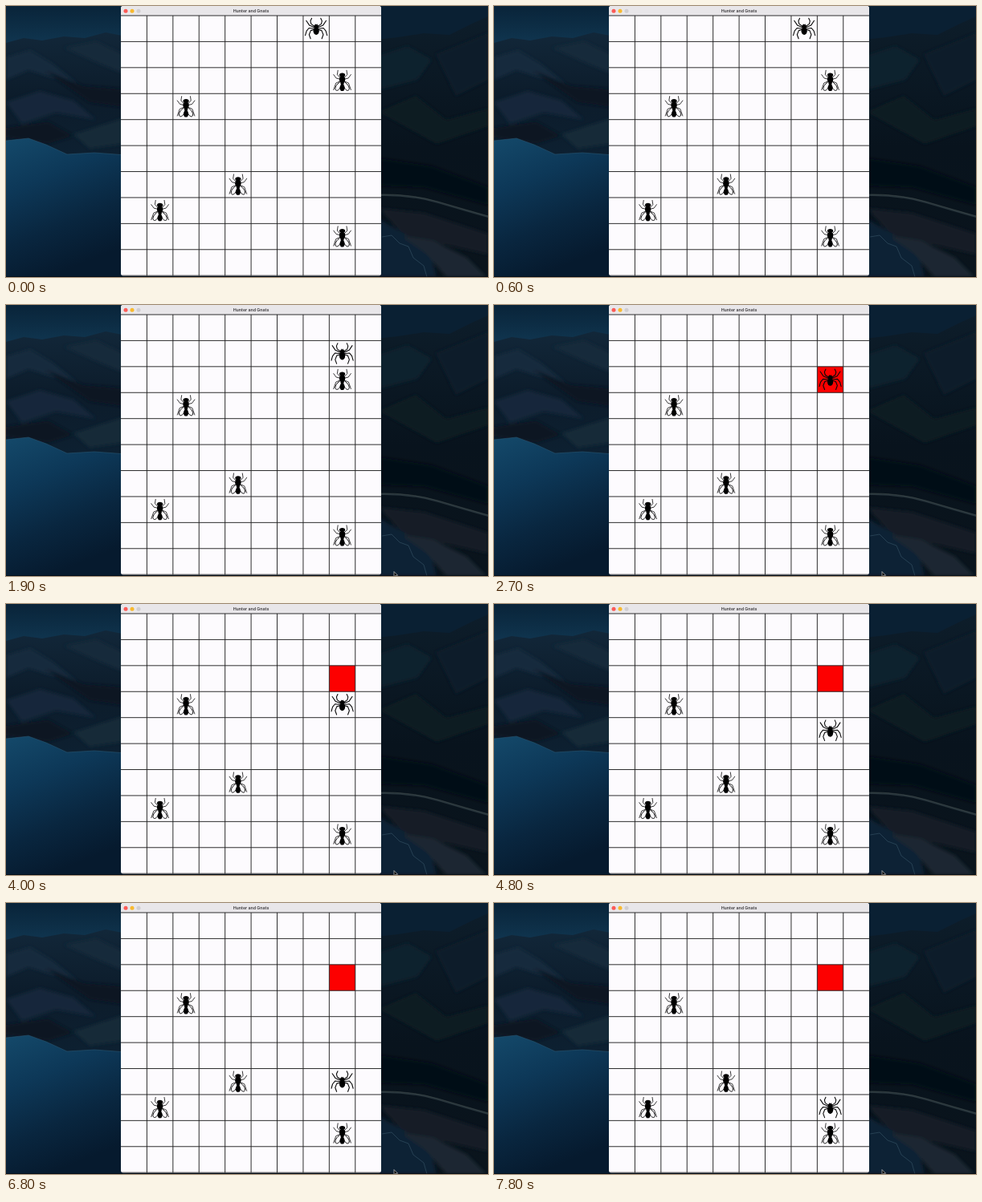
An HTML page for the animation above (8 s loop, 600x338 px).

```html
<!DOCTYPE html>
<html lang="en">
<head>
<meta charset="utf-8">
<title>Hunter and Gnats</title>
<style>
  html, body { margin: 0; width: 100%; height: 100%; overflow: hidden; background: #071420; }
  svg { display: block; width: 100vw; height: 100vh; }
  .title { font: 600 5.3px Inter, "Open Sans", sans-serif; fill: #3c3a3d; text-anchor: middle; }
  .legs { fill: none; stroke: #0a0a0a; stroke-linejoin: round; stroke-linecap: round; }
</style>
</head>
<body>
<svg viewBox="0 0 600 338" preserveAspectRatio="none">
  <defs>
    <linearGradient id="sky" x2="0" y2="1">
      <stop offset="0" stop-color="#092439"/><stop offset="1" stop-color="#123a56"/>
    </linearGradient>
    <linearGradient id="hill" x2="0" y2="1">
      <stop offset="0" stop-color="#122739"/><stop offset=".5" stop-color="#0c1c2b"/><stop offset="1" stop-color="#0d2031"/>
    </linearGradient>
    <linearGradient id="sea" x2=".35" y2="1">
      <stop offset="0" stop-color="#14496a"/><stop offset=".35" stop-color="#0d3858"/>
      <stop offset=".7" stop-color="#09263f"/><stop offset="1" stop-color="#061a2e"/>
    </linearGradient>
    <linearGradient id="east" x2="0" y2="1">
      <stop offset="0" stop-color="#0d1d2a"/><stop offset=".5" stop-color="#08131d"/><stop offset="1" stop-color="#0a141c"/>
    </linearGradient>
    <filter id="soft" x="-20%" y="-20%" width="140%" height="140%"><feGaussianBlur stdDeviation="2.2"/></filter>
    <clipPath id="frame"><rect x="143" y="0" width="324" height="336.5" rx="3"/></clipPath>

    <g id="half-fly">
      <path class="legs" stroke-width=".8" d="M-3-4L-6.2-7.5L-5.4-12.8M-3-2L-7.5-3L-10.8-7.5M-3 1L-7.8 3L-10.8 11.5"/>
      <path d="M-2 1C-5 3-9.2 7-8.6 10.6C-8.1 13.4-4.4 13-2.2 8" fill="#fdfbfe" stroke="#0a0a0a" stroke-width="1"/>
    </g>
    <g id="fly">
      <use href="#half-fly"/><use href="#half-fly" transform="scale(-1 1)"/>
      <ellipse cy="-7" rx="3.6" ry="2.5"/>
      <ellipse cy="-1.6" rx="3.7" ry="4"/>
      <path d="M-2.6 1H2.6L1.7 5C3.5 7.5 3.6 11 1.5 13H-1.5C-3.6 11-3.5 7.5-1.7 5Z"/>
    </g>
    <g id="half-spider">
      <path class="legs" stroke-width="1.1" d="M-1.5-2.5L-6.3-5.8L-7.2-9.5L-5.6-13M-2-1.5L-8.6-4.3L-12.4-10M-2 0L-9-.7L-12 3L-13.6 8.5M-1.8 1L-6.8 2.4L-8.8 7.5L-7 12.5"/>
    </g>
    <g id="spider">
      <use href="#half-spider"/><use href="#half-spider" transform="scale(-1 1)"/>
      <ellipse cy="-2.6" rx="2.8" ry="2.6"/>
      <ellipse cy="3" rx="3.6" ry="4.8"/>
      <path d="M-1.5-4L-1.2-6.3L0-4.5L1.2-6.3L1.5-4Z"/>
    </g>
  </defs>

  <!-- coast, left -->
  <rect width="150" height="60" fill="url(#sky)"/>
  <path d="M0 46L22 40L45 43L72 38L98 40L124 33L150 38V190H0Z" fill="url(#hill)"/>
  <g filter="url(#soft)">
    <path d="M0 64L30 55L58 72L88 96L60 90L28 80L0 92Z" fill="#172b3d"/>
    <path d="M72 52L112 44L146 60V84L112 70Z" fill="#15293a"/>
    <path d="M0 120L42 106L84 118L112 142L62 133L20 147Z" fill="#14283a"/>
    <path d="M48 80L96 100L146 104V126L104 120Z" fill="#091622"/>
    <path d="M84 160L146 140V172L104 178Z" fill="#162a39"/>
    <path d="M0 152L52 144L84 162L52 172L0 164Z" fill="#091722"/>
  </g>
  <path d="M0 168L28 165L50 173L76 185L110 183L150 186V338H0Z" fill="url(#sea)"/>
  <path d="M0 168L28 165L50 173L76 185L110 183L150 186" fill="none" stroke="#2b5873" stroke-opacity=".55"/>

  <!-- hills and road, right -->
  <rect x="460" width="140" height="60" fill="#0a2033"/>
  <path d="M460 42L488 39L520 34L552 36L578 23L600 13V338H460Z" fill="url(#east)"/>
  <g filter="url(#soft)">
    <path d="M464 62L500 50L530 67L512 92L466 104Z" fill="#10212d"/>
    <path d="M535 60L600 34V92L560 112Z" fill="#0f1e29"/>
    <path d="M464 132L510 112L548 142L600 128V150L536 172Z" fill="#0c1a24"/>
    <path d="M464 190L530 200L600 226V248L520 226L464 224Z" fill="#050c13"/>
    <path d="M464 252L520 258L600 284V310L548 298L500 292Z" fill="#131e26"/>
    <path d="M464 266L496 284L528 306L536 338H464Z" fill="#0a2135"/>
    <path d="M490 286L530 292L574 314L598 338H548L522 308Z" fill="#1a2832"/>
  </g>
  <path d="M464 236Q504 235 538 245T604 264" fill="none" stroke="#27343b" stroke-width="2.2"/>
  <path d="M464 235Q504 234 538 244T604 263" fill="none" stroke="#46504f" stroke-width=".5"/>
  <path d="M468 288L480 286L490 296L501 300L507 314L520 324L524 338" fill="none" stroke="#385568" stroke-opacity=".6"/>
  <rect y="337" width="600" height="1" fill="#03080d" opacity=".6"/>

  <!-- window -->
  <g clip-path="url(#frame)">
    <rect x="143" width="324" height="337" fill="#fdfbfe"/>
    <rect x="143" width="324" height="12" fill="#e8e6e9"/>
    <circle cx="149" cy="6.2" r="2.5" fill="#fc5b57"/>
    <circle cx="157" cy="6.2" r="2.5" fill="#f8b92f"/>
    <circle cx="165" cy="6.2" r="2.5" fill="#d0ced1"/>
    <text class="title" x="305" y="8">Hunter and Gnats</text>
    <rect id="kill" fill="#fd0000"/>
    <path id="grid" fill="none" stroke="#222" stroke-width=".95"/>
    <g id="flies"></g>
    <use id="hunter" href="#spider"/>
  </g>
  <path id="cursor" d="M483 332.5V339L484.5 337.6L485.6 340L486.6 339.5L485.6 337.2H487.6Z" fill="#080808" stroke="#e6e6e6" stroke-width=".6"/>
</svg>
<script>
  const LOOP = 8000, STEP = 1000, FIRST = 690, CURSOR_AT = 690;
  const X0 = 143, Y0 = 12, CELL = 32.42;
  const $ = id => document.getElementById(id);
  const place = (col, row) =>
    `translate(${X0 + (col + .5) * CELL} ${Y0 + (row + .5) * CELL})`;
  const show = (el, on) => el.setAttribute("visibility", on ? "visible" : "hidden");

  // column, row on each turn
  const route = [[7, 0], [8, 0], [8, 1], [8, 2], [8, 3], [8, 4], [8, 5], [8, 6], [8, 7]];
  const prey = [[8, 2], [2, 3], [4, 6], [1, 7], [8, 8]];
  const CATCH = 3;

  let lines = `M${X0} ${Y0}h324`;
  for (let i = 1; i < 10; i++) {
    lines += `M${X0 + i * CELL} ${Y0}v325M${X0} ${Y0 + i * CELL}h325`;
  }
  $("grid").setAttribute("d", lines + `M${X0} 336.2h324`);

  const flies = prey.map(([col, row]) => {
    const fly = document.createElementNS("http://www.w3.org/2000/svg", "use");
    fly.setAttribute("href", "#fly");
    fly.setAttribute("transform", place(col, row));
    return $("flies").appendChild(fly);
  });

  const [killCol, killRow] = prey[0];
  const box = { x: X0 + killCol * CELL, y: Y0 + killRow * CELL, width: CELL, height: CELL };
  for (const key in box) $("kill").setAttribute(key, box[key]);

  function draw(now) {
    const t = now % LOOP;
    const turn = t < FIRST ? 0 : Math.min(route.length - 1, 1 + Math.floor((t - FIRST) / STEP));
    $("hunter").setAttribute("transform", place(...route[turn]));
    show($("kill"), turn >= CATCH);
    show(flies[0], turn < CATCH);
    show($("cursor"), t >= CURSOR_AT);
  }

  const start = performance.now();
  function tick() {
    draw(performance.now() - start);
    requestAnimationFrame(tick);
  }
  tick();
</script>
</body>
</html>
```
